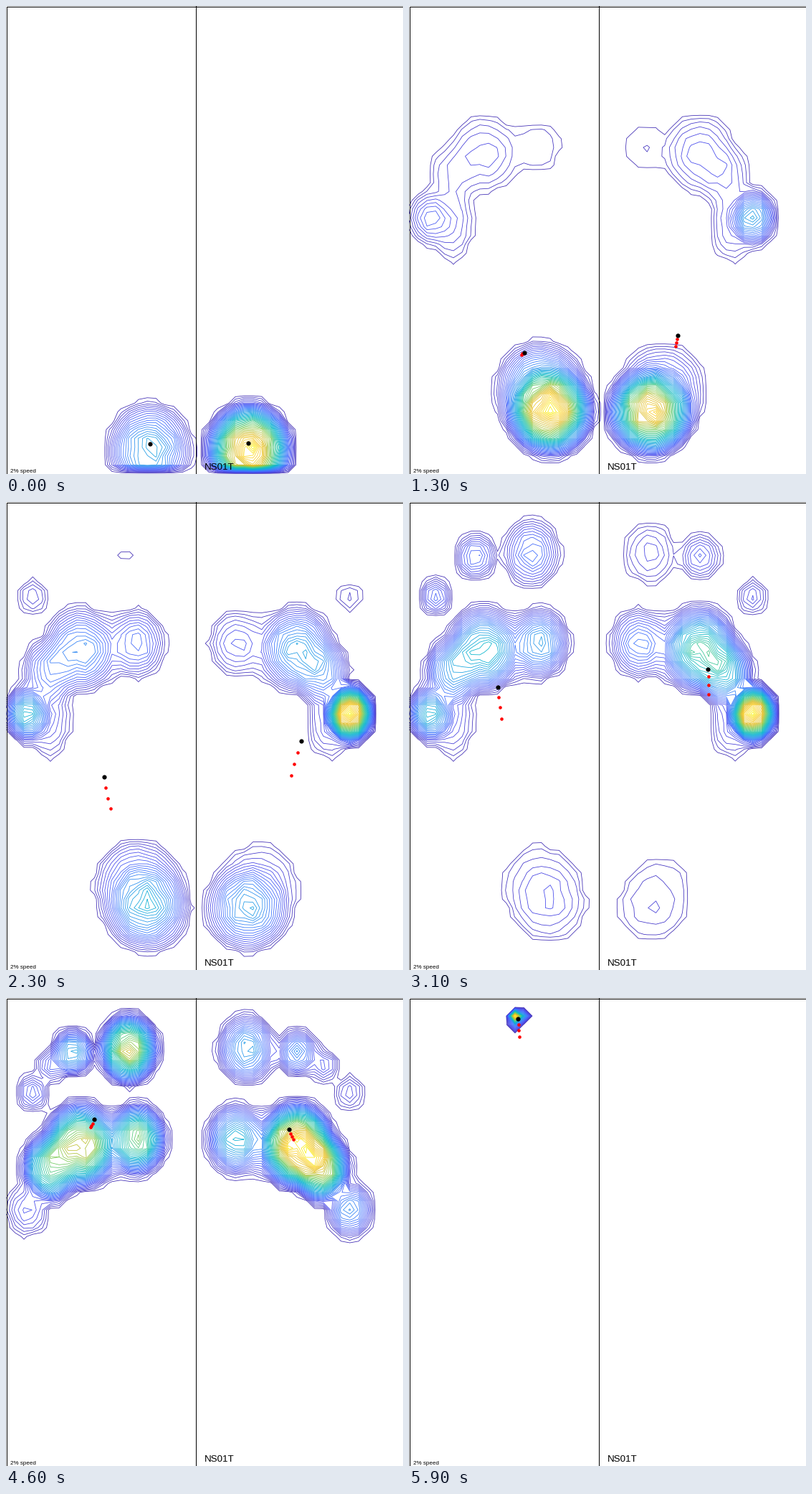
A matplotlib script that plays this animation: 554 by 652 pixels, repeating every 6000 ms.

```python
import matplotlib.pyplot as plt
import numpy as np
from matplotlib.animation import FuncAnimation
from matplotlib.colors import LinearSegmentedColormap

W, H, DPI = 554, 652, 64
FRAMES, INTERVAL = 60, 100
PX = 72 / DPI
LEVELS = 50
THRESHOLD = 1.5
TRAIL = 3
RIGHT_END = 58

PARULA = LinearSegmentedColormap.from_list("parula", [
    "#3e26a8", "#4747eb", "#3e6fff", "#2797eb", "#08b5d0",
    "#31c69f", "#81cc59", "#dcbd29", "#fccf30", "#f9fb15"])

# Sensor grid; the bottom row and the gap between the feet carry no load
X, Y = np.meshgrid(np.linspace(0.5, W - 0.5, 46), np.linspace(0.5, H - 0.5, 54))
gain = np.random.default_rng(4).uniform(0.93, 1.07, X.shape)
gain[-1] = 0
gain[:, 22] = 0

regions = []


def region(x, y, r, load, span, tilt=0):
    """Add a dome to each foot; x and load are (left, right) pairs."""
    for cx, peak, angle in zip(x, load, (tilt, -tilt)):
        c, s = np.cos(np.radians(angle)), np.sin(np.radians(angle))
        dx, dy = X - cx, Y - y
        u = (dx * c + dy * s) / r[0]
        v = (dy * c - dx * s) / r[1]
        dome = np.clip(1 - u**2 - v**2, 0, None) ** 1.5
        regions.append((peak * dome * gain, span))


def pulse(i, start, full, hold, end):
    """Rise slowly, hold, then fall away."""
    rise = np.clip((i - start) / (full - start), 0, 1)
    fall = np.clip((end - i) / (end - hold), 0, 1)
    return rise**1.5 * fall**2


# Heel: strike, main pad, broad pad
region((200, 339), 618, (69, 75), (20, 50), (-9, 0, 0, 8))
region((197, 337), 565, (69, 71), (50, 50), (0, 9, 13, 37))
region((188, 349), 543, (74, 86), (28, 14), (0, 10, 13, 45), -20)
# Outer edge, then the ball from the fifth to the first metatarsal
region((60, 450), 302, (40, 72), (6, 6), (2, 12, 31, 50))
region((30, 480), 295, (38, 47), (22, 50), (3, 20, 41, 53))
region((62, 440), 236, (46, 57), (34, 42), (0, 46, 46, 56))
region((103, 406), 205, (60, 70), (40, 50), (0, 46, 46, 56))
region((183, 320), 197, (47, 58), (35, 23), (5, 46, 46, 56))
region((122, 386), 207, (110, 62), (14, 12), (0, 40, 46, 56), -15)
# Toes from big to small, then the last push-off
region((171, 336), 71, (48, 57), (50, 24), (20, 50, 56, 59))
region((93, 406), 76, (36, 39), (22, 16), (20, 38, 52, 58))
region((64, 444), 94, (28, 28), (9, 8), (26, 46, 52, 58))
region((37, 479), 132, (27, 32), (10, 6), (14, 28, 48, 57))
region((152.5, -50), 29.3, (11.2, 11.2), (50, 0), (53, 59, 59, 60))


def pressure(i):
    z = np.sqrt(sum((dome * pulse(i, *span)) ** 2 for dome, span in regions))
    return np.where(z < THRESHOLD, 0, z)


def smooth_path(t, points):
    """Cubic Hermite path through points given as (x, y) at times t."""
    t, p = np.array(t, float), np.array(points, float)
    f = np.arange(FRAMES)
    k = np.clip(np.searchsorted(t, f, "right") - 1, 0, len(t) - 2)
    h = (t[k + 1] - t[k])[:, None]
    s = np.clip((f - t[k])[:, None] / h, 0, 1)
    m = np.gradient(p, t, axis=0)
    ease = s * s * (3 - 2 * s)
    return (p[k] + (p[k + 1] - p[k]) * ease
            + h * s * (1 - s) * ((1 - s) * m[k] - s * m[k + 1]))


# Centre of pressure of each foot
times = (0, 10, 13, 20, 23, 28, 31, 38, 46, 56, 59)
left = smooth_path(times, [
    (201, 610), (157, 486), (161, 483), (145.5, 426.5), (136.5, 383),
    (128.5, 301.5), (124, 258), (114.5, 193), (123, 169), (153.5, 53.5),
    (152, 29)])
right = smooth_path(times, [
    (338, 609), (372, 474), (375, 459), (397.5, 381), (411.5, 333),
    (418, 267.5), (417, 232.5), (408.5, 210.5), (394.5, 183), (355, 82),
    (340, 60)])

fig = plt.figure(figsize=(W / DPI, H / DPI), dpi=DPI, facecolor="white")
ax = fig.add_axes([0, 0, 1, 1])
ax.set(xlim=(0, W), ylim=(H, 0))
ax.axis("off")

line = dict(color="black", lw=PX, zorder=3)
ax.plot([0.5, W - 0.5, W - 0.5, 0.5, 0.5],
        [0.5, 0.5, H - 0.5, H - 0.5, 0.5], solid_joinstyle="miter", **line)
ax.plot([264.5, 264.5], [0, H], **line)

label = dict(family="Liberation Sans", color="black", va="baseline", zorder=4)
ax.text(6, 650, "2% speed", size=8 * PX, **label)
ax.text(277, 646, "NS01T", size=13.33 * PX, **label)

dot = dict(ls="", marker="o", mew=0)
trail, = ax.plot([], [], color="red", ms=4.6 * PX, zorder=5, **dot)
head, = ax.plot([], [], color="black", ms=6.2 * PX, zorder=6, **dot)
contours = []


def update(i):
    while contours:
        contours.pop().remove()
    z = pressure(i)
    top = z.max()
    levels = np.linspace(0, top, LEVELS + 2)[1:-1]
    contours.append(ax.contour(X, Y, z, levels=levels, cmap=PARULA, vmin=0,
                               vmax=top, linewidths=0.8 * PX, zorder=2))
    active = [left, right] if i < RIGHT_END else [left]
    head.set_data(*np.array([path[i] for path in active]).T)
    trail.set_data(*np.vstack([path[max(0, i - TRAIL):i] for path in active]).T)
    return contours + [trail, head]


anim = FuncAnimation(fig, update, frames=FRAMES, interval=INTERVAL,
                     init_func=lambda: [], repeat=True, repeat_delay=0,
                     blit=False)
plt.show()
```
